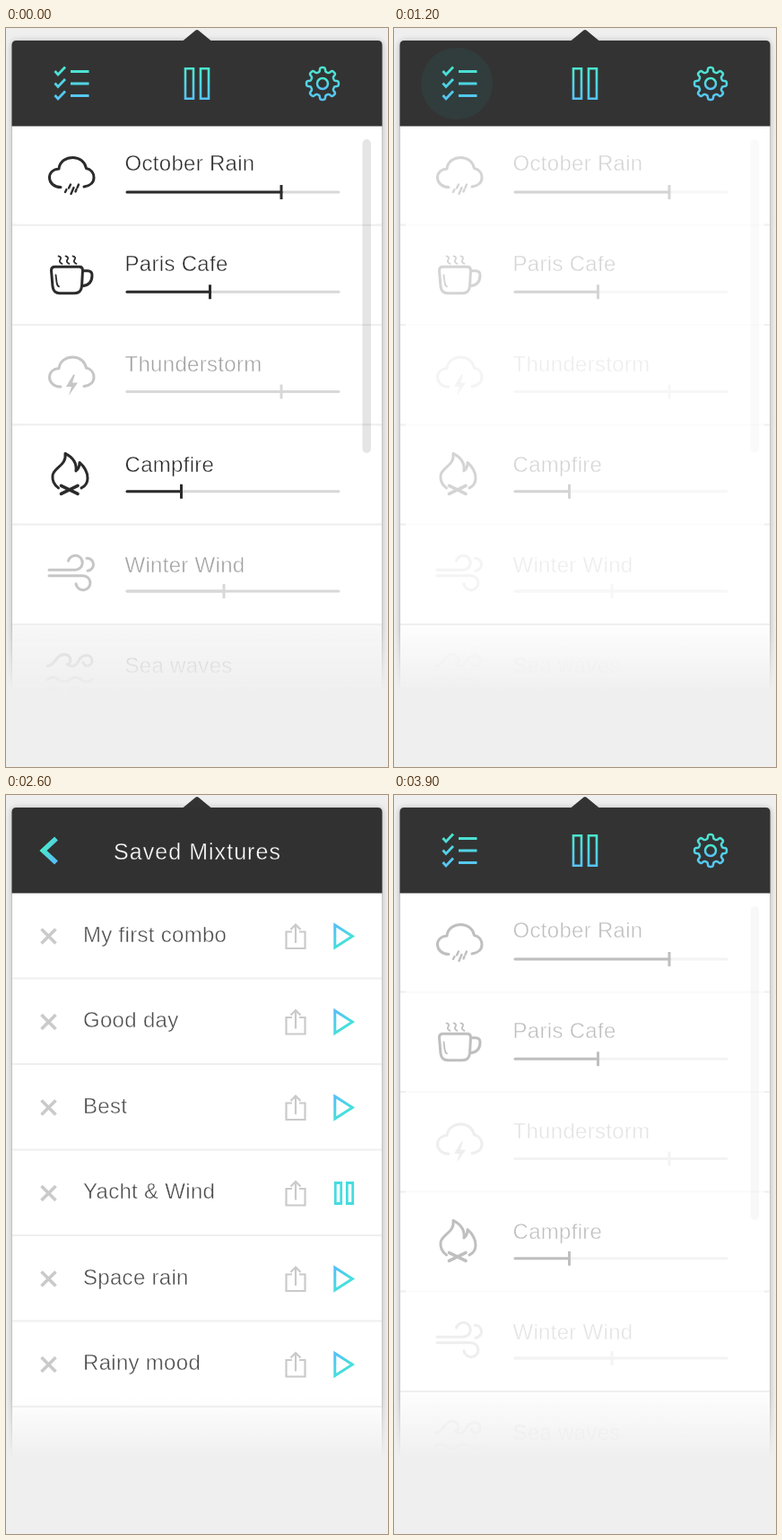
An HTML page for the animation above (4 s loop, 426 by 824 pixels).

```html
<!DOCTYPE html>
<html lang="en">
<head>
<meta charset="utf-8">
<title>Sound mixer</title>
<style>
  html, body { margin: 0; width: 100%; height: 100%; overflow: hidden; background: #efefef; }
  svg { display: block; width: 426px; height: 824px; fill: none; }
  text { font: 24px "Liberation Sans", Arial, sans-serif; letter-spacing: .3px; stroke: #fff; stroke-width: .5px; }
  .title { font-size: 25px; letter-spacing: 1.05px; fill: #fff; stroke: #313131; stroke-width: .4px; }
  .panel { fill: #fff; stroke: #c6c6c6; filter: drop-shadow(0 0 3px rgba(0, 0, 0, .22)); }
  .rule { stroke: #efefef; stroke-width: 2; }
  .icon { stroke-width: 3; stroke-linecap: round; stroke-linejoin: round; }
  .grey { stroke: #cacaca; }

  .main, .saved, .mix, .combos, .play, .pause { animation: 4s step-end infinite; }
  .main { animation-name: main; }
  .saved { animation-name: saved; }
  .mix { animation-name: mix; }
  .combos { animation-name: combos; }
  .play { animation-name: play; }
  .pause { animation-name: pause; }
  .ripple {
    fill: #1ecfcb; opacity: 0; transform-box: fill-box; transform-origin: center;
    animation: ripple 4s step-end infinite;
  }

  @keyframes main { 0% { opacity: 1 } 32.5% { opacity: 0 } 97.5%, 100% { opacity: 1 } }
  @keyframes saved { 0% { opacity: 0 } 32.5% { opacity: 1 } 97.5%, 100% { opacity: 0 } }
  @keyframes mix {
    0% { opacity: 1 } 27.5% { opacity: .6 } 30% { opacity: .2 }
    97.5% { opacity: .3 } 100% { opacity: 1 }
  }
  @keyframes combos {
    0% { opacity: 1 } 92.5% { opacity: .6 } 95% { opacity: .2 } 97.5%, 100% { opacity: 1 }
  }
  @keyframes play { 0% { opacity: 1 } 65%, 100% { opacity: 0 } }
  @keyframes pause { 0% { opacity: 0 } 65%, 100% { opacity: 1 } }
  @keyframes ripple {
    0% { opacity: .25; transform: scale(1) }
    2.5% { opacity: .15; transform: scale(calc(1 + var(--grow) / 2)) }
    5% { opacity: .06; transform: scale(calc(1 + var(--grow))) }
    7.5%, 100% { opacity: 0; transform: scale(1) }
  }
</style>
</head>
<body>
<svg viewBox="0 0 426 824">
  <defs>
    <linearGradient id="down" x1="0" y1="0" x2="0" y2="1">
      <stop offset="0" stop-color="#4be6cf"/><stop offset="1" stop-color="#57c4f7"/>
    </linearGradient>
    <linearGradient id="diag" x1="0" y1="0" x2="1" y2="1">
      <stop offset=".2" stop-color="#4be6cc"/><stop offset="1" stop-color="#57bcfa"/>
    </linearGradient>
    <linearGradient id="up" x1="0" y1="0" x2=".6" y2="1">
      <stop offset="0" stop-color="#57bff8"/><stop offset=".8" stop-color="#46dfdc"/>
    </linearGradient>
    <linearGradient id="fade" x1="0" y1="0" x2="0" y2="1">
      <stop offset="0" stop-color="#efefef" stop-opacity="0"/><stop offset="1" stop-color="#efefef"/>
    </linearGradient>
  </defs>

  <rect class="panel" x="6.5" y="14.5" width="413" height="760" rx="5"/>
  <path d="M197 14.5L211.5 2.5q1.5-1.2 3 0L229 14.5z" fill="#333"/>

  <g class="main">
    <path d="M6.5 109.5V19q0-5 5-5H414.500q5 0 5 5V109.500z" fill="#333"/>
    <g stroke="url(#down)" stroke-width="2.8">
      <path d="M54.500 48l3.500 4 8-8.500M72 48.500h20.500M54.500 61.500l3.500 4 8-8.500M72 62h20.500M54.500 75l3.500 4 8-8.500M72 75.500h20.500"/>
      <path d="M200 45.300h9v33.400h-9zM217 45.300h9v33.400h-9z" stroke-width="2.6"/>
      <path id="gear" stroke-width="2.5" stroke-linejoin="round"/>
      <circle cx="353" cy="62" r="6" stroke-width="2.5"/>
    </g>
    <circle class="ripple" cx="70" cy="62" r="20" style="--grow:1;animation-delay:1s"/>
    <path class="rule" d="M7 219.500h6m400 0h6M7 331h6m400 0h6M7 442.500h6m400 0h6M7 553.500h6m400 0h6M7 665h412"/>
    <g class="mix" id="mix"></g>
  </g>

  <g class="saved">
    <path d="M6.500 109.500V19q0-5 5-5H414.500q5 0 5 5V109.500z" fill="#313131"/>
    <path d="M56 48.500L41.500 62L56 75.500" stroke="url(#diag)" stroke-width="5.600"/>
    <text class="title" x="213.500" y="72" text-anchor="middle">Saved Mixtures</text>
    <circle class="ripple" cx="50" cy="62" r="20" style="--grow:1;animation-delay:3.6s"/>
    <g class="combos" id="combos"></g>
  </g>

  <rect y="670" width="426" height="70" fill="url(#fade)"/>
  <rect y="740" width="426" height="84" fill="#efefef"/>
</svg>

<script>
  const DARK = '#2b2b2b', PALE = '#c6c6c6', TRACK = '#d8d8d8';
  const $ = id => document.getElementById(id);
  const path = (d, attrs = '') => `<path d="${d}" ${attrs}/>`;

  // Icons of the first three rows are placed relative to their row's top.
  const cloud = path('M61 67.500C54 67.500 48.500 63 48.500 57S53 47.500 59 47C60 38.500 67 34.500 74.500 34.500S88 39 89.500 46.500C95 47.500 98 52 98 57S94 66 87 67');
  const icons = {
    rain: cloud + path('M72 64.500l-2 4M67.500 70l-1.500 3M75.500 68l-3 7M81 64.500l-1.500 3.500M78.500 70l-1 2.500', 'stroke-width="2.4"'),
    cup: path('M54.500 45h27.500q3.500 0 3.500 4l-1 18q-1 7.500-8 7.500H60q-7 0-8-7.500l-1.500-18q0-4 4-4zM86 49.500h5q5 0 5 5q0 11-11 12') +
      path('M55.500 54l1 8q.5 4 2.500 5M58.500 33q4 1 2 4t2 4.500M66.500 33q4 1 2 4t2 4.500M74.500 33q4 1 2 4t2 4.500', 'stroke-width="1.8"'),
    storm: cloud + path('M75 54L67 67.500h6L70 77.500L80 63h-6L77 54z', `fill="${PALE}" stroke="none"`),
    fire: path('M58.500 69C53 65 51.500 60 52 55C53 46 68 44 66 30.500C75 35 79 42 78 50C80.500 48 82 45 82 40.500C87 45 91 52 91 58C91 63 88 67 84 69') +
      path('M61.500 66.500L80 75.500M80 66.500L61.500 75.500', 'stroke-width="3.6"'),
    wind: path('M48 49H77a8 8 0 1 0-7.500-10M48 55.500H86a8 8 0 1 1-8 9M90 36a7 7 0 0 1 1 14'),
    waves: path('M46 45c9 0 9-13 19-13c8 0 9 10 3 11c7 5 11 0 13-4c4-8 15-8 15 0c0 6-8 8-10 2M46 60q6-5 12.500 0t12.500 0t12.500 0t12.500 0M46 72q6-5 12.500 0t12.500 0t12.500 0t12.500 0')
  };

  const sounds = [
    ['October Rain', 'rain', 307, true],
    ['Paris Cafe', 'cup', 227.500, true],
    ['Thunderstorm', 'storm', 307, false],
    ['Campfire', 'fire', 195.500, true],
    ['Winter Wind', 'wind', 243, false],
    ['Sea waves', 'waves', 0, false]
  ];

  function soundRow([name, icon, knob, on], i) {
    const top = 110 + 111.300 * i;
    const y = 183 + 111.250 * i;
    const tone = on ? DARK : TRACK;
    const slider = knob
      ? path(`M135 ${y}H371`, `class="icon" stroke="${TRACK}"`) +
        path(`M135 ${y}H${knob}`, `class="icon" stroke="${tone}"`) +
        path(`M${knob} ${y - 8}v16`, `stroke="${tone}" stroke-width="3"`) +
        path(`M7 ${219.700 + 111.300 * i}h412`, 'class="rule"')
      : '';
    return `<g class="icon" stroke="${on ? DARK : PALE}" transform="translate(0 ${top})">${icons[icon]}</g>
      <text x="132.500" y="${159 + 112 * i}" fill="${on ? DARK : '#a2a2a2'}">${name}</text>${slider}`;
  }

  const combos = ['My first combo', 'Good day', 'Best', 'Yacht &amp; Wind', 'Space rain', 'Rainy mood'];
  const PLAYED = 3;

  function comboRow(name, i) {
    const y = 157.500 + 95.500 * i;
    const mid = i === PLAYED ? y - 1.500 : y;
    const play = path(`M366.800 ${mid - 12.500}v25l19.500-12.500z`,
      `stroke="url(#up)" stroke-width="3" ${i === PLAYED ? 'class="play"' : ''}`);
    const pause = i === PLAYED
      ? path(`M367.300 ${y - 11.500}h6.400v23h-6.400zM380.300 ${y - 11.500}h6.400v23h-6.400z`,
          'class="pause" stroke="#45dce0" stroke-width="2.8"')
      : '';
    return path(`M39.500 ${y - 8}l16 16m0-16l-16 16`, 'class="grey" stroke-width="3.6"') +
      `<text x="86" y="${164 + 95.400 * i}" fill="#4c4c4c">${name}</text>` +
      path(`M319 ${y - 5}h-6.500v18.500h21v-18.500h-6.500M323 ${y + 7.500}v-20M317.500 ${y - 7.500}l5.500-5.500 5.500 5.500`,
        'class="grey" stroke-width="2.2"') +
      play + pause + path(`M7 ${204.500 + 95.500 * i}h412`, 'class="rule"');
  }

  function gearPath() {
    const steps = 160;
    const points = Array.from({ length: steps }, (_, i) => {
      const a = i / steps * 2 * Math.PI;
      const r = 15.700 + 2.300 * Math.tanh(2.500 * Math.cos(8 * a));
      return `${(353 + r * Math.cos(a)).toFixed(2)} ${(62 + r * Math.sin(a)).toFixed(2)}`;
    });
    return `M${points.join('L')}z`;
  }

  $('gear').setAttribute('d', gearPath());
  $('mix').innerHTML = sounds.map(soundRow).join('') +
    '<rect x="397.5" y="124" width="9.500" height="350" rx="4.700" fill="#000" opacity=".1"/>' +
    '<rect x="7" y="666" width="412" height="74" fill="#efefef" opacity=".5"/>';
  $('combos').innerHTML = combos.map(comboRow).join('') +
    '<circle class="ripple" cx="374" cy="447" r="20" style="--grow:.5;animation-delay:2.3s"/>';
</script>
</body>
</html>
```
